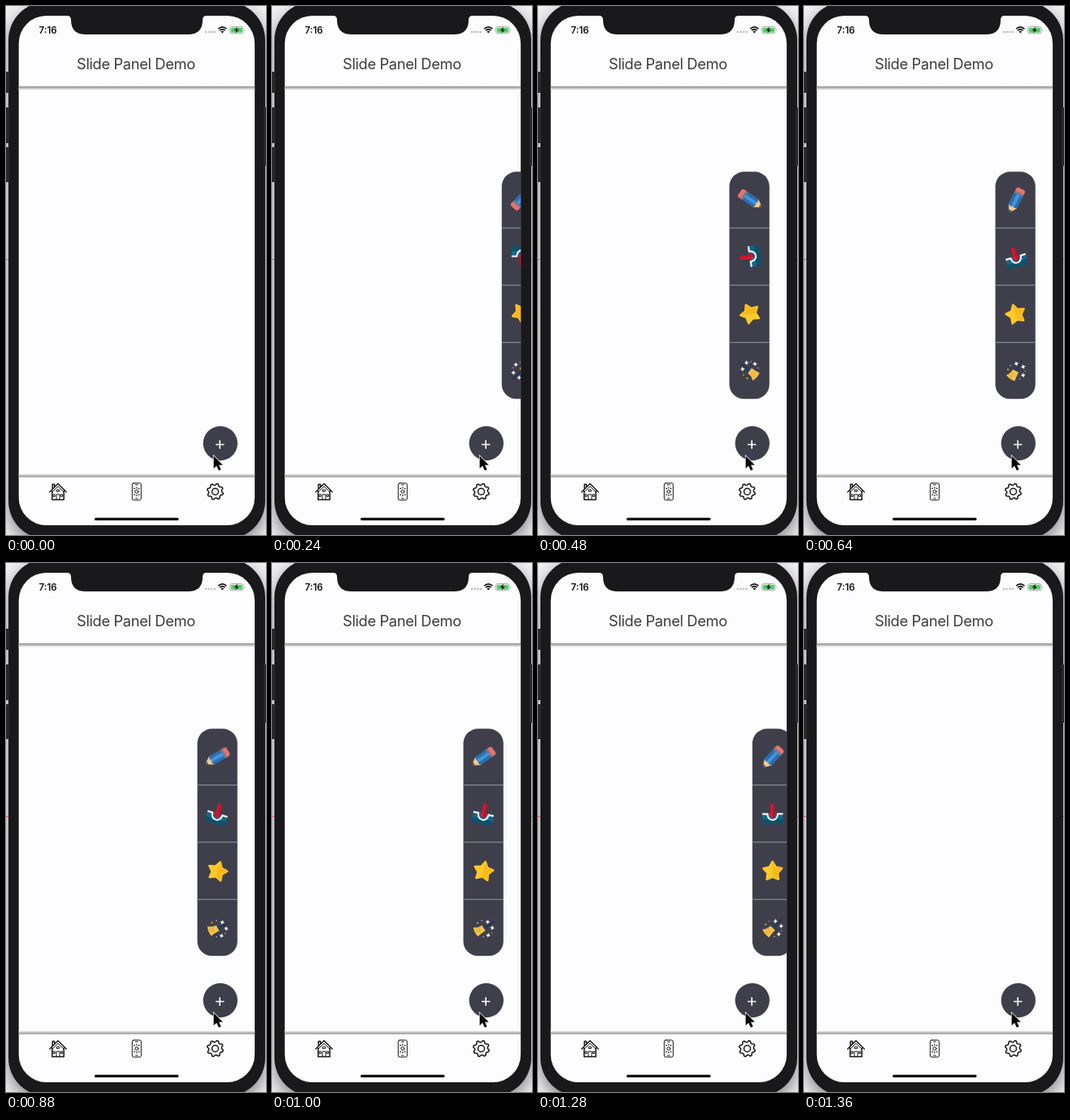
Animation of 320 by 652 pixels, one loop 2000 ms. Source, as an HTML page:

```html
<!DOCTYPE html>
<html lang="en">
<head>
<meta charset="utf-8">
<title>Slide Panel Demo</title>
<style>
  html, body { margin: 0; height: 100%; overflow: hidden; background: #f0eff2; }
  svg { display: block; width: 320px; height: 652px; font-family: Inter, Roboto, sans-serif; }
  .body { fill: #19181b; filter: drop-shadow(0 8px 10px rgba(0, 0, 0, .45)); }
  .line { fill: none; stroke: #17171a; stroke-width: 1.5; stroke-linejoin: round; stroke-linecap: round; }
  .thin { stroke-width: 1; }
</style>
</head>
<body>
<svg viewBox="0 0 320 652">
  <defs>
    <linearGradient id="shade" x2="0" y2="1">
      <stop stop-color="#8e8e90"/><stop offset=".4" stop-color="#b9b9bb"/><stop offset="1" stop-color="#fdfcfe"/>
    </linearGradient>
    <clipPath id="screen"><rect x="15.7" y="12" width="290.4" height="628" rx="34"/></clipPath>
    <path id="spark" d="M0-3Q.5-.5 3 0Q.5 .5 0 3Q-.5 .5-3 0Q-.5-.5 0-3Z" fill="#f4f4f8"/>
  </defs>

  <!-- phone body -->
  <rect width="320" height="652" fill="#f0eff2"/>
  <rect class="body" x="3" y="-5" width="316" height="662" rx="47"/>
  <path d="M0 312.5H3M319 312.5H320" stroke="#e5536a"/>
  <path d="M0 81h4v26h-4zM0 125h4v44h-4zM0 174h4v43h-4zM317 125h3v72h-3z" fill="#28282b"/>
  <rect x="15.7" y="12" width="290.4" height="628" rx="34" fill="#fdfcfe"/>
  <path d="M75 11H247V12Q242 12 242 17Q242 35 224 35H98Q80 35 80 17Q80 12 75 12Z" fill="#19181b"/>

  <!-- status bar -->
  <text x="40.5" y="33.5" font-size="11.5" font-weight="600" fill="#111">7:16</text>
  <g fill="#b8b8bc">
    <circle cx="246" cy="32" r="1.2"/><circle cx="249.6" cy="32" r="1.2"/>
    <circle cx="253.2" cy="32" r="1.2"/><circle cx="256.8" cy="32" r="1.2"/>
  </g>
  <g fill="none" stroke="#111" stroke-width="1.7">
    <path d="M261.2 28.2Q266.3 23.6 271.4 28.2M263 30.2Q266.3 27.3 269.6 30.2"/>
    <path d="M264.4 31.4Q266.3 30 268.2 31.4L266.3 33.4Z" fill="#111" stroke="none"/>
  </g>
  <rect x="275.5" y="25.5" width="16.6" height="8.4" rx="2.4" fill="#fff" stroke="#999c9a" stroke-width=".8"/>
  <rect x="276.7" y="26.7" width="14.2" height="6" rx="1.3" fill="#4fd066"/>
  <path d="M293.2 28.2q1.3 1.5 0 3z" fill="#999c9a"/>
  <path d="M285 25.8L280.6 30.2H283.4L282.4 33.6L287 29.2H284.2Z" fill="#111"/>

  <!-- header and tab bar -->
  <text x="87" y="78" font-size="18.3" letter-spacing="-.35" fill="#3b3b3e">Slide Panel Demo</text>
  <rect x="15.7" y="99" width="290.4" height="5" fill="url(#shade)"/>
  <rect x="15.7" y="-580.7" width="290.4" height="4.5" fill="url(#shade)" transform="scale(1 -1)"/>
  <g class="line">
    <path d="M53.8 599L64 588.8L74.2 599M56.8 598V608.6H71.2V598M57.2 595V589.5H59.6V592.5"/>
    <path class="thin" d="M56.5 599.5L64 592L71.5 599.5M62 608.5V602H66V608.5M67.8 602h1.8v2.6h-1.8zM58.4 602h1.8v2.6h-1.8zM62.6 596.2h2.8v2.2h-2.8z"/>
    <g class="thin">
      <rect x="155.3" y="588" width="11" height="21" rx="2"/>
      <path d="M159.3 590h3M159.5 607h2.6M157.5 594.5h1.2M162.9 594.5h1.2M157.5 602.5h1.2M162.9 602.5h1.2M160.8 593v1.5M160.8 602.5v1.5"/>
      <circle cx="160.8" cy="598.5" r="2"/>
    </g>
    <path id="gear"/>
    <circle cx="257.5" cy="598.5" r="4"/>
  </g>
  <rect x="109" y="630.7" width="103.5" height="3.3" rx="1.6" fill="#08080a"/>

  <!-- sliding panel -->
  <g clip-path="url(#screen)">
    <g id="panel">
      <rect x="235.5" y="204.3" width="49.3" height="280" rx="18" fill="#3f3f4b"/>
      <path d="M235.5 273.7h49.3M235.5 344.2h49.3M235.5 414.7h49.3" stroke="#87878c" stroke-width="1.3"/>

      <g class="icon">
        <g transform="rotate(-47)">
          <path d="M-15.5-1.5L-8-6V6L-15.5 1.5Q-16.5 0-15.5-1.5Z" fill="#f6c790"/>
          <path d="M-15.5-1.5L-14-2.4V2.4L-15.5 1.5Q-16.5 0-15.5-1.5Z" fill="#5b5350"/>
          <path d="M-8-6H8V6H-8L-9.5 3L-8 0L-9.5-3Z" fill="#2a70b0"/>
          <path d="M-9-2H8V2H-9Z" fill="#4595da"/>
          <path d="M7.5-6h2.5v12h-2.5z" fill="#6f7f93"/>
          <path d="M10-6H12.5Q15.5-6 15.5-3V3Q15.5 6 12.5 6H10Z" fill="#e5736e"/>
        </g>
      </g>

      <g class="icon">
        <path d="M-12.8-1.5H12.8V12H-12.8Z" fill="#14678a"/>
        <path d="M-12.8 6H12.8V12H-12.8Z" fill="#10506a"/>
        <path d="M-12.8-1.5H-5.5Q-5 6 0 6Q5 6 5.5-1.5H12.8V.7H7.4Q6 8 0 8Q-6 8-7.4 .7H-12.8Z" fill="#f0f2f5"/>
        <path d="M-2.4-12.5H2.4V-1H5.2L0 5.5L-5.2-1H-2.4Z" fill="#e0162f"/>
        <path d="M0-12.5H2.4V-1H5.2L0 5.5Z" fill="#c4112b"/>
      </g>

      <g class="icon" stroke-width="2.6" stroke-linejoin="round">
        <path id="star" fill="#fec92c" stroke="#fec92c"/>
        <path id="starHalf" fill="#fbb817"/>
      </g>

      <g class="icon">
        <path d="M3-3L11-11" stroke="#263455" stroke-width="2.2" stroke-linecap="round"/>
        <path d="M-2.5-3.5Q-7 1-12.5 1Q-10.5 7-4.5 11Q-2 7 3.2 2Z" fill="#f3c14a"/>
        <path d="M-9 2L-6 6M-6 0L-3 6" stroke="#d9a133" stroke-width=".9"/>
        <path d="M-3-4L-.5-5L4.8 .5L3.5 2.5Z" fill="#27406d"/>
        <use href="#spark" x="3.5" y="-9"/><use href="#spark" x="10.5" y="-3"/>
        <use href="#spark" x="7.5" y="7"/>
        <g fill="#8ea1c4">
          <circle cx="-4" cy="-9" r=".9"/><circle cx="2" cy="10" r=".9"/><circle cx="11" cy="3" r=".8"/>
        </g>
        <circle cx="-8.5" cy="-5" r="1" fill="#f3c14a"/>
      </g>
    </g>
  </g>

  <!-- button and pointer -->
  <circle cx="263.8" cy="539" r="21.2" fill="#3f3f4b"/>
  <path d="M258 540.5h10.4M263.2 535.3v10.4" stroke="#fff" stroke-width="1.6"/>
  <path d="M255.6 554.5V570L259.2 566.8L261.8 572.6L264.6 571.3L262 565.8H266.8Z"
    fill="#050505" stroke="#fff" stroke-width="1.4" paint-order="stroke"/>
</svg>
<script>
const $ = id => document.getElementById(id);
const icons = [...document.querySelectorAll('.icon')];
const LOOP = 2000, STEP = 40, TRAVEL = 74, ROW = 70.4;

const ring = (count, radius, cx = 0, cy = 0) =>
  'M' + Array.from({ length: count }, (_, i) => {
    const a = i / count * 2 * Math.PI - Math.PI / 2;
    const r = radius(i);
    return (cx + r * Math.cos(a)).toFixed(2) + ' ' + (cy + r * Math.sin(a)).toFixed(2);
  }).join('L') + 'Z';

const starRadius = i => i % 2 ? 6.6 : 12;
$('star').setAttribute('d', ring(10, starRadius));
$('starHalf').setAttribute('d', ring(10, i => i > 5 ? 0 : starRadius(i)));
$('gear').setAttribute('d', ring(32, i => (i + 1) % 4 < 2 ? 8 : 10, 257.5, 598.5));

const progress = (t, from, to) => Math.min(1, Math.max(0, (t - from) / (to - from)));
const easeInOut = p => p < .5 ? 2 * p * p : 1 - 2 * (1 - p) ** 2;

// underdamped spring from 1 to 0
function spring(seconds) {
  if (seconds <= 0) return 1;
  const decay = 4.2, freq = 5.6, a = freq * seconds;
  return Math.exp(-decay * seconds) * (Math.cos(a) + decay / freq * Math.sin(a));
}

function draw() {
  const t = Math.floor(performance.now() % LOOP / STEP) * STEP;
  const shown = easeInOut(progress(t, 155, 355)) - easeInOut(progress(t, 1210, 1370));
  $('panel').setAttribute('transform', `translate(${TRAVEL * (1 - shown)} 0)`);
  const angle = -180 * spring((t - 300) / 1000);
  icons.forEach((icon, i) => icon.setAttribute('transform',
    `translate(260.4 ${238.5 + ROW * i}) rotate(${angle}) translate(0 .8)`));
  requestAnimationFrame(draw);
}
draw();
</script>
</body>
</html>
```
